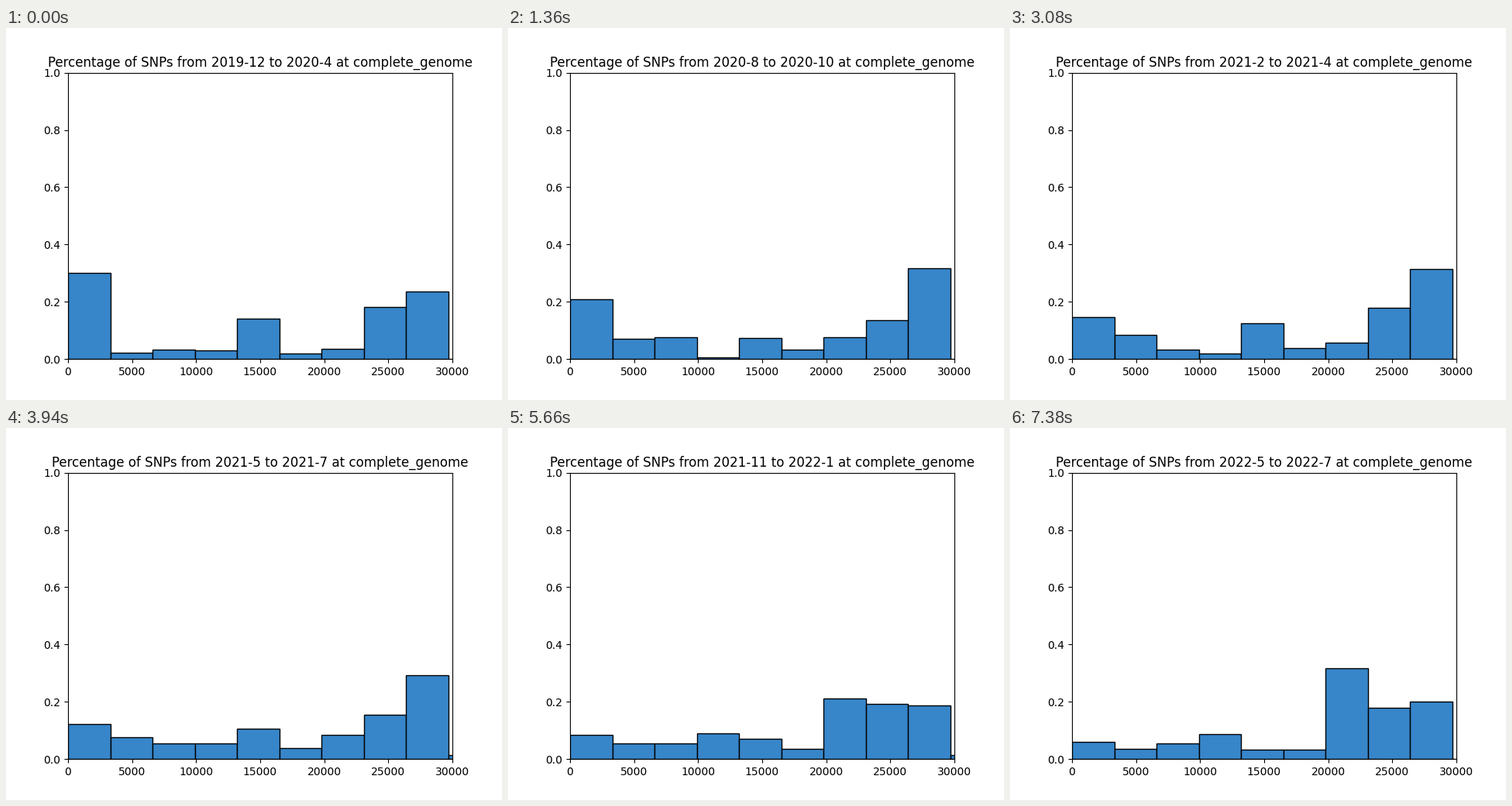
These frames come from a looping animation (640 px wide and 480 px high, 8000 ms). A matplotlib script:

```python
import math

import matplotlib.pyplot as plt
import numpy as np
from matplotlib.animation import FuncAnimation

LOOP_MS = 8000
STEP_MS = 20
FIRST_MS = 500   # the first chart is held for less time than the others
HOLD_MS = 860
BIN_WIDTH = 3300
TOTAL = 0.997    # shares add up to just under one

# Fine horizontal hinting keeps letter spacing close to the font's own widths
plt.rcParams["text.hinting_factor"] = 32


def trend(period, *points):
    """Straight lines through a few (period, share) points."""
    return np.interp(period, *zip(*points))


def shares(period):
    """Share of SNPs in each genome bin, from left to right."""
    left = [
        0.3 * math.exp(-0.18 * period),
        trend(period, (0, .022), (3, .095), (9, .035)),
        0.054 - 0.022 * math.cos(math.pi * period / 2),
        trend(period, (0, .030), (2, .006), (3, .044), (4, .019),
              (6, .093), (9, .086)),
        trend(period, (0, .140), (2, .074), (4, .125), (9, .033)),
        trend(period, (0, .019), (3, .040), (9, .033)),
        trend(period, (0, .035), (3, .095), (4, .057), (6, .111),
              (7, .211), (9, .317)),
        trend(period, (0, .182), (2, .136), (3, .141), (4, .179),
              (6, .130), (7, .193), (9, .179)),
    ]
    tail = max(0, 0.03 - 0.015 * abs(period - 6))
    return [*left, TOTAL - sum(left) - tail, tail]


def month_name(months):
    """Format a month count that starts at 2020-1."""
    return f"{2020 + months // 12}-{months % 12 + 1}"


def period_title(period):
    start = -1 if period == 0 else 1 + 3 * period
    end = 3 + 3 * period
    return (f"Percentage of SNPs from {month_name(start)} "
            f"to {month_name(end)} at complete_genome")


def period_at(ms):
    return 0 if ms < FIRST_MS else 1 + (ms - FIRST_MS) // HOLD_MS


fig, ax = plt.subplots(figsize=(6.4, 4.8), dpi=100)
lefts = [i * BIN_WIDTH for i in range(10)]
bars = ax.bar(lefts, shares(0), width=BIN_WIDTH, align="edge",
              color="#3786c9", edgecolor="black")
ax.set_xlim(0, 30000)
ax.set_ylim(0, 1)
title = ax.set_title(period_title(0), y=1.0)


def update(frame):
    period = period_at(frame * STEP_MS)
    for bar, share in zip(bars, shares(period)):
        bar.set_height(share)
    title.set_text(period_title(period))
    return [*bars, title]


anim = FuncAnimation(fig, update, frames=LOOP_MS // STEP_MS,
                     interval=STEP_MS, repeat=True, repeat_delay=0)
plt.show()
```
